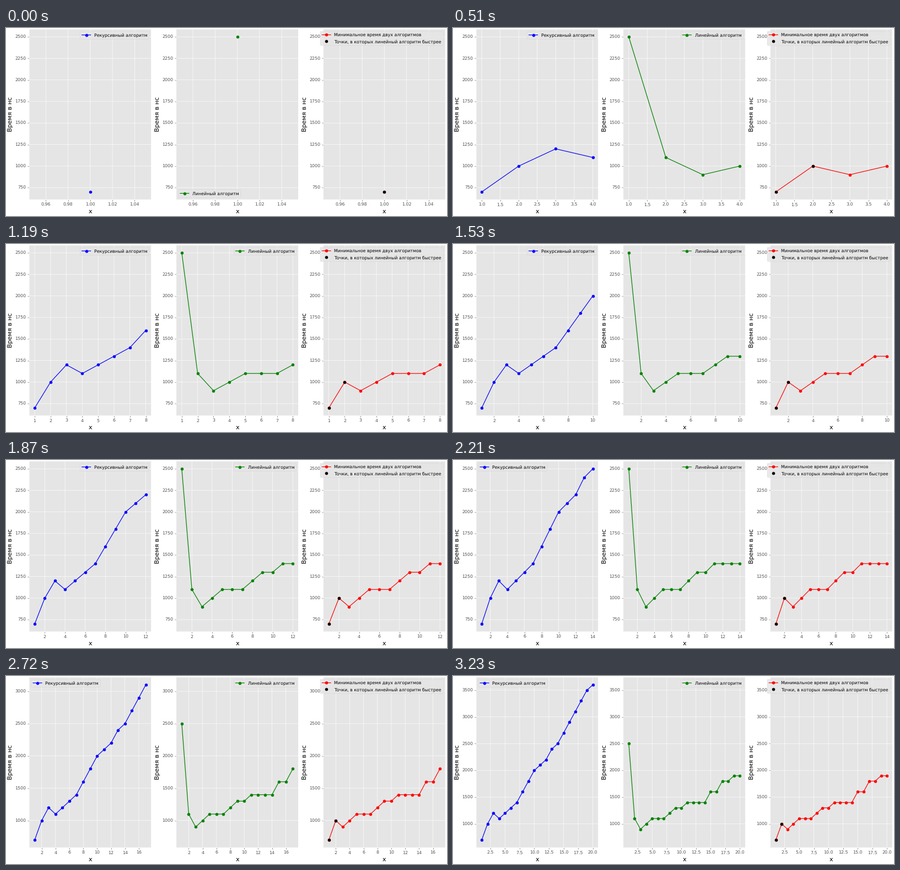
A matplotlib script for the animation above (3.58 s loop, 800 px wide and 343 px high).

```python
import numpy as np
import matplotlib.pyplot as plt
from matplotlib.animation import FuncAnimation

WIDTH, HEIGHT = 800, 343
DPI = 400 / 7
LOOP_MS, TICK_MS, STEP_MS = 3580, 20, 170

RECURSIVE = 100 * np.array([7, 10, 12, 11, 12, 13, 14, 16, 18, 20,
                            21, 22, 24, 25, 27, 29, 31, 33, 35, 36])
LINEAR = 100 * np.array([25, 11, 9, 10, 11, 11, 11, 12, 13, 13,
                         14, 14, 14, 14, 16, 16, 18, 18, 19, 19])
FASTEST = np.minimum(RECURSIVE, LINEAR)
X = np.arange(1, len(LINEAR) + 1)
MARKED = RECURSIVE < LINEAR

plt.style.use("ggplot")
# Unhinted text and unsnapped lines keep their true size at this low dpi.
plt.rcParams.update({"font.family": "DejaVu Sans",
                     "text.hinting": "none",
                     "path.snap": False})

# The small surplus keeps the pixel size from rounding down.
fig = plt.figure(figsize=((WIDTH + 1e-6) / DPI, (HEIGHT + 1e-6) / DPI),
                 dpi=DPI, facecolor="white")


def add_panel(index):
    left, top, width, height = 42 + 266.8 * index, 2, 221.6, 311.2
    ax = fig.add_axes([left / WIDTH, 1 - (top + height) / HEIGHT,
                       width / WIDTH, height / HEIGHT])
    ax.set_xlabel("x", fontsize=14, color="black")
    ax.set_ylabel("Время в нс", fontsize=14, color="black")
    return ax


def add_line(ax, color, label, style="-"):
    return ax.plot([], [], color=color, marker="o", linestyle=style,
                   label=label)[0]


panels = [add_panel(i) for i in range(3)]
curves = [
    (add_line(panels[0], "blue", "Рекурсивный алгоритм"), RECURSIVE),
    (add_line(panels[1], "green", "Линейный алгоритм"), LINEAR),
    (add_line(panels[2], "red", "Минимальное время двух алгоритмов"), FASTEST),
]
dots = add_line(panels[2], "black",
                "Точки, в которых линейный алгоритм быстрее", "None")
legends = [ax.legend(loc="upper right") for ax in panels]


def padded(low, high):
    margin = 0.05 * (high - low)
    return low - margin, high + margin


def update(tick):
    # Rounding up by half a tick keeps each step from starting late.
    step = (tick * TICK_MS + TICK_MS // 2) // STEP_MS
    count = min(step + 1, len(X))

    for line, values in curves:
        line.set_data(X[:count], values[:count])
    shown = MARKED[:count]
    dots.set_data(X[:count][shown], FASTEST[:count][shown])

    x_range = padded(1, count) if count > 1 else padded(0.95, 1.05)
    seen = np.concatenate([RECURSIVE[:count], LINEAR[:count]])
    y_range = padded(seen.min(), seen.max())
    for ax in panels:
        ax.set_xlim(x_range)
        ax.set_ylim(y_range)

    legends[0].set_loc("upper left" if count >= 14 else "upper right")
    legends[1].set_loc("lower left" if count == 1 else "upper right")
    return [line for line, _ in curves] + [dots]


animation = FuncAnimation(fig, update, frames=LOOP_MS // TICK_MS,
                          interval=TICK_MS, repeat=True, repeat_delay=0)
plt.show()
```
